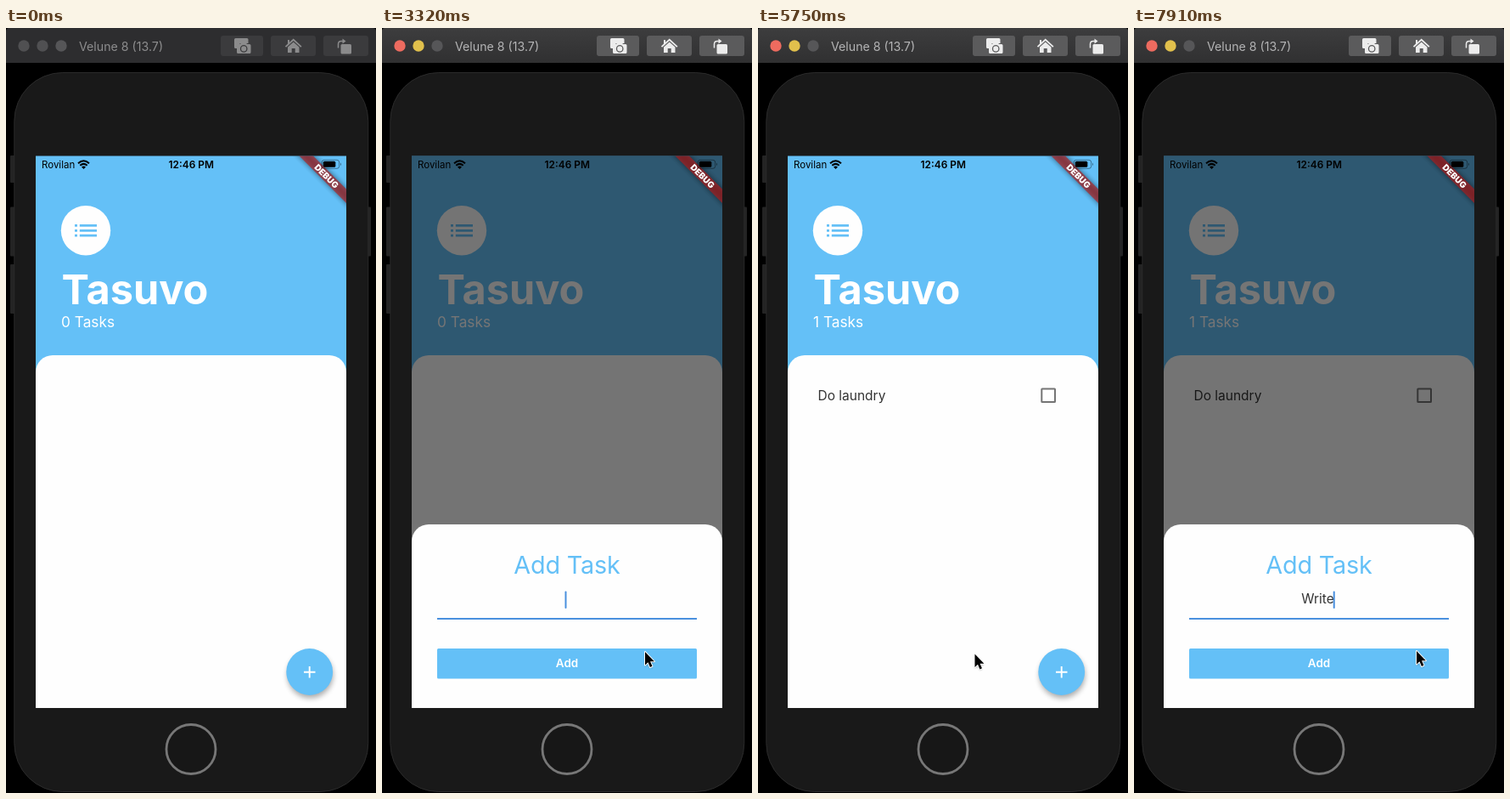
An HTML page for the animation above (8 s loop, 436x900 px).

```html
<!DOCTYPE html>
<html lang="en">
<head>
<meta charset="utf-8">
<title>Task list demo</title>
<style>
  html, body { margin: 0; width: 100%; height: 100%; overflow: hidden; background: #000; }
  svg { display: block; width: 436px; height: 900px; }
  text { font-family: Inter, Roboto, sans-serif; white-space: pre; }
  .mid { text-anchor: middle; }
  .bar { --dot1: #505052; --dot2: #505052; --btn: #3b3b3d; --icon: #8b8b8c; --label: #8d8d8e; }
  .bar.active { --dot1: #ed6b5f; --dot2: #e1c04c; --btn: #5b5b5c; --icon: #ececec; --label: #b4b4b5; }
  .bar .shine { visibility: hidden; }
  .bar.active .shine { visibility: visible; }
  .btn { fill: var(--btn); }
  .icon { fill: var(--icon); }
</style>
</head>
<body>
<svg viewBox="0 0 436 900" xmlns="http://www.w3.org/2000/svg">
  <defs>
    <linearGradient id="shine" x2="0" y2="1">
      <stop stop-color="#3d3d3e"/><stop offset="1" stop-color="#303031"/>
    </linearGradient>
    <clipPath id="screen"><rect x="35" y="150.5" width="366" height="649.5"/></clipPath>
    <filter id="blur" x="-50%" y="-50%" width="200%" height="200%"><feGaussianBlur stdDeviation="3"/></filter>
    <filter id="soft" x="-50%" y="-50%" width="200%" height="200%"><feGaussianBlur stdDeviation="1"/></filter>
  </defs>
  <rect width="436" height="900"/>

  <g class="bar" id="bar">
    <path d="M0 41V4Q0 0 4 0H432Q436 0 436 4V41Z" fill="#2d2d2f"/>
    <path class="shine" d="M0 41V4Q0 0 4 0H432Q436 0 436 4V41Z" fill="url(#shine)"/>
    <circle cx="21" cy="21" r="6.7" fill="var(--dot1)"/>
    <circle cx="43" cy="21" r="6.7" fill="var(--dot2)"/>
    <circle cx="65" cy="21" r="6.7" fill="#565658"/>
    <text x="86" y="26.5" font-size="14.2" fill="var(--label)">Velune 8 (13.7)</text>
    <rect class="btn" x="253" y="9" width="50" height="24" rx="3"/>
    <rect class="btn" x="312" y="9" width="53" height="24" rx="3"/>
    <rect class="btn" x="374" y="9" width="53" height="24" rx="3"/>
    <g class="icon">
      <path d="M270.5 12H284Q285.5 12 285.5 13.5V18H276L273 21V24H270.5Q269 24 269 22.5V13.5Q269 12 270.5 12Z"/>
      <path d="M273.5 19H276L277.5 17H282.5L284 19H287Q288.5 19 288.5 20.5V28.5Q288.5 30 287 30H273.5Q272 30 272 28.5V20.5Q272 19 273.5 19Z"/>
      <circle cx="280.2" cy="24.4" r="3.7" fill="none" stroke="var(--btn)" stroke-width="1.3"/>
      <path d="M338.7 12.5L348.5 21.5L347.3 22.7L338.7 15L330.1 22.7L328.9 21.5L332 18.6V14H334V16.8Z"/>
      <path d="M338.7 16.5L345.5 22.5V29H340.7V24H336.7V29H332V22.5Z"/>
      <rect x="394.5" y="19" width="12.5" height="11.5" rx="1.5"/>
      <path d="M391.5 23.5V19Q391.5 15.500 395 15.500H398" fill="none" stroke="var(--icon)" stroke-width="1.5"/>
      <path d="M396.5 12.5L400.5 15.5L396.5 18.5Z"/>
    </g>
  </g>

  <g fill="#242424">
    <rect x="5" y="150" width="6" height="32" rx="1"/>
    <rect x="5" y="210.500" width="6" height="58" rx="1"/>
    <rect x="5" y="278" width="6" height="58" rx="1"/>
    <rect x="424" y="210.5" width="6" height="58" rx="1"/>
  </g>
  <rect x="9.8" y="52.5" width="417" height="846" rx="57" fill="#191919" stroke="#2b2b2b"/>
  <circle cx="218" cy="848.5" r="29" fill="#171717" stroke="#777" stroke-width="2.8"/>

  <g clip-path="url(#screen)">
    <rect x="35" y="150" width="366" height="651" fill="#64c0f7"/>
    <circle cx="94" cy="238.2" r="29.2" fill="#fefefe"/>
    <path d="M81 232.4h3m2.8 0H107M81 238.3h3m2.8 0H107M81 244.2h3m2.8 0H107" stroke="#64c0f7" stroke-width="2.7"/>
    <g fill="#fff">
      <text x="65.5" y="324.5" font-size="48.7" font-weight="700">Tasuvo</text>
      <text id="count" x="65" y="352.2" font-size="17.3">0 Tasks</text>
    </g>
    <rect x="35" y="385" width="366" height="450" rx="20" fill="#fefefe"/>
    <g id="item" visibility="hidden">
      <text x="70.5" y="437.7" font-size="15.5" fill="#333">Do laundry</text>
      <rect x="334.3" y="424.4" width="15.7" height="15.7" rx=".6" fill="none" stroke="#757575" stroke-width="2"/>
    </g>
    <circle cx="358.5" cy="761.5" r="27" opacity=".32" filter="url(#blur)"/>
    <circle cx="357.7" cy="757.5" r="27.4" fill="#64c0f7"/>
    <path d="M351 757.7H364.5M357.7 751V764.5" stroke="#fff" stroke-width="1.9"/>

    <rect id="dim" x="35" y="150" width="366" height="651" opacity="0"/>
    <g id="sheet" visibility="hidden">
      <rect x="35" width="366" height="230" fill="#757575"/>
      <rect x="35" width="366" height="250" rx="20" fill="#fefefe"/>
      <text class="mid" x="218" y="57.8" font-size="28.8" letter-spacing="-.2" fill="#64c0f7">Add Task</text>
      <text class="mid" id="draft" x="216.5" y="93.3" font-size="15.5" fill="#333"></text>
      <rect id="caret" y="78.5" width="2" height="20.5" rx="1" fill="#4a90de"/>
      <rect id="line" x="65" width="306"/>
      <rect x="65" y="146" width="306" height="35.5" rx="1.5" fill="#64c0f7"/>
      <text class="mid" x="218" y="168.3" font-size="13.5" font-weight="600" fill="#fff">Add</text>
    </g>

    <g transform="translate(400.7 150.5) rotate(45)">
      <rect x="-60" y="27.3" width="120" height="11.7" opacity=".5" filter="url(#blur)"/>
      <rect x="-60" y="27.3" width="120" height="11.7" fill="#b71c1c" opacity=".63"/>
      <text class="mid" x=".6" y="36.8" font-size="10.1" font-weight="900" fill="#fff">DEBUG</text>
    </g>

    <text x="42" y="164.7" font-size="11.5">Rovilan</text>
    <path d="M85 159.2Q91.5 153.2 98 159.2M87.3 161.8Q91.5 158 95.7 161.8" fill="none" stroke="#000" stroke-width="2"/>
    <path d="M91.5 166L89 163.4Q91.5 161.4 94 163.4Z"/>
    <text class="mid" x="218.2" y="164.8" font-size="11.9" font-weight="600">12:46 PM</text>
    <rect x="372.2" y="155.3" width="20.5" height="10" rx="2.7" fill="none" stroke="#000" stroke-opacity=".4"/>
    <rect x="373.8" y="156.8" width="14.5" height="7" rx="1.5"/>
    <path d="M394 158.5Q396 160.3 394 162Z" opacity=".45"/>
  </g>

  <g id="pointer" visibility="hidden">
    <path d="M0 1.5V16L3.4 13L5.6 18L8 17L5.8 12H10.3Z" opacity=".4" filter="url(#soft)"/>
    <path d="M0 0V14.7L3.3 11.6L5.6 17L8 15.9L5.7 10.7H10.3Z" stroke="#fff" stroke-width="1.8" stroke-linejoin="round" paint-order="stroke"/>
  </g>
</svg>
<script>
const LOOP = 8000;
const STEP = 96;
const ACTIVATE = 100, APPEAR = 1000, ADD = 5460;

const home = [250, 404];
const moves = [
  { start: 1400, steps: 7, to: [314, 738], via: [[150, 350], [100, 480]] },
  { start: 2170, steps: 3, to: [347, 754] },
  { start: 3030, steps: 2, to: [310, 734] },
  { start: 5080, steps: 4, to: [255.5, 736.5] },
  { start: 5940, steps: 5, to: [352, 759] },
  { start: 7020, steps: 2, to: [333, 733] }
];
const sheets = [
  { open: 2750, close: 5650 },
  { open: 6530, close: LOOP }
];
const bursts = [
  { start: 3510, gap: 135, text: 'Do laundry', sheet: sheets[0] },
  { start: 7310, gap: STEP, text: 'W', sheet: sheets[1] },
  { start: 7610, gap: STEP, text: 'rite', sheet: sheets[1] }
];

const $ = id => document.getElementById(id);
const set = (id, attrs) => {
  for (const name in attrs) $(id).setAttribute(name, attrs[name]);
};
const show = (id, on) => set(id, { visibility: on ? 'visible' : 'hidden' });
const clamp = (v, lo = 0, hi = 1) => Math.min(hi, Math.max(lo, v));
const progress = (t, start, steps) => clamp((Math.floor((t - start) / STEP) + 1) / steps);
const bezier = (a, b, c, d, u) => {
  const v = 1 - u;
  return v * v * v * a + 3 * v * v * u * b + 3 * v * u * u * c + u * u * u * d;
};

function pointerAt(t) {
  let from = home;
  for (const { start, steps, to, via = [from, to] } of moves) {
    const u = progress(t, start, steps);
    if (u < 1) return from.map((a, i) => bezier(a, via[0][i], via[1][i], to[i], u));
    from = to;
  }
  return from;
}

// Text so far, and the time of the last key
function typing(t, sheet) {
  let text = '', last = sheet.open;
  for (const b of bursts) {
    if (b.sheet !== sheet || t < b.start) continue;
    const sampled = Math.floor((t - b.start) / STEP) * STEP;
    const count = Math.min(b.text.length, 1 + Math.floor(sampled / b.gap));
    text += b.text.slice(0, count);
    last = b.start + (count - 1) * b.gap;
  }
  return { text, last };
}

function renderSheet(t) {
  const sheet = sheets.find(s => t >= s.open && progress(t, s.close, 2) < 1);
  show('sheet', sheet);
  set('dim', { opacity: 0 });
  if (!sheet) return;

  const opened = progress(t, sheet.open, 2);
  const height = opened ** .74 * (1 - progress(t, sheet.close, 2));
  set('sheet', { transform: `translate(0 ${800.2 - 216.2 * height})` });
  set('dim', { opacity: .54 * height ** 1.6 });
  set('line', opened < 1
    ? { y: 111, height: 1, fill: '#8c8c8c' }
    : { y: 110, height: 2, fill: '#4a90de' });

  const { text, last } = typing(t, sheet);
  const draft = $('draft');
  draft.textContent = text;
  const width = text ? draft.getComputedTextLength() : 0;
  // The caret fades once typing has paused
  set('caret', { x: 215.5 + width / 2, opacity: clamp(1 - (t - last - 600) / 150, .1) });
}

function render(t) {
  $('bar').classList.toggle('active', t >= ACTIVATE);

  const [x, y] = pointerAt(t);
  show('pointer', t >= APPEAR);
  set('pointer', { transform: `translate(${x} ${y}) scale(1.06)` });

  const added = t >= ADD;
  show('item', added);
  $('count').textContent = `${added ? 1 : 0} Tasks`;
  renderSheet(t);
}

const begin = performance.now();
function tick() {
  render((performance.now() - begin) % LOOP);
  requestAnimationFrame(tick);
}
tick();
</script>
</body>
</html>
```
